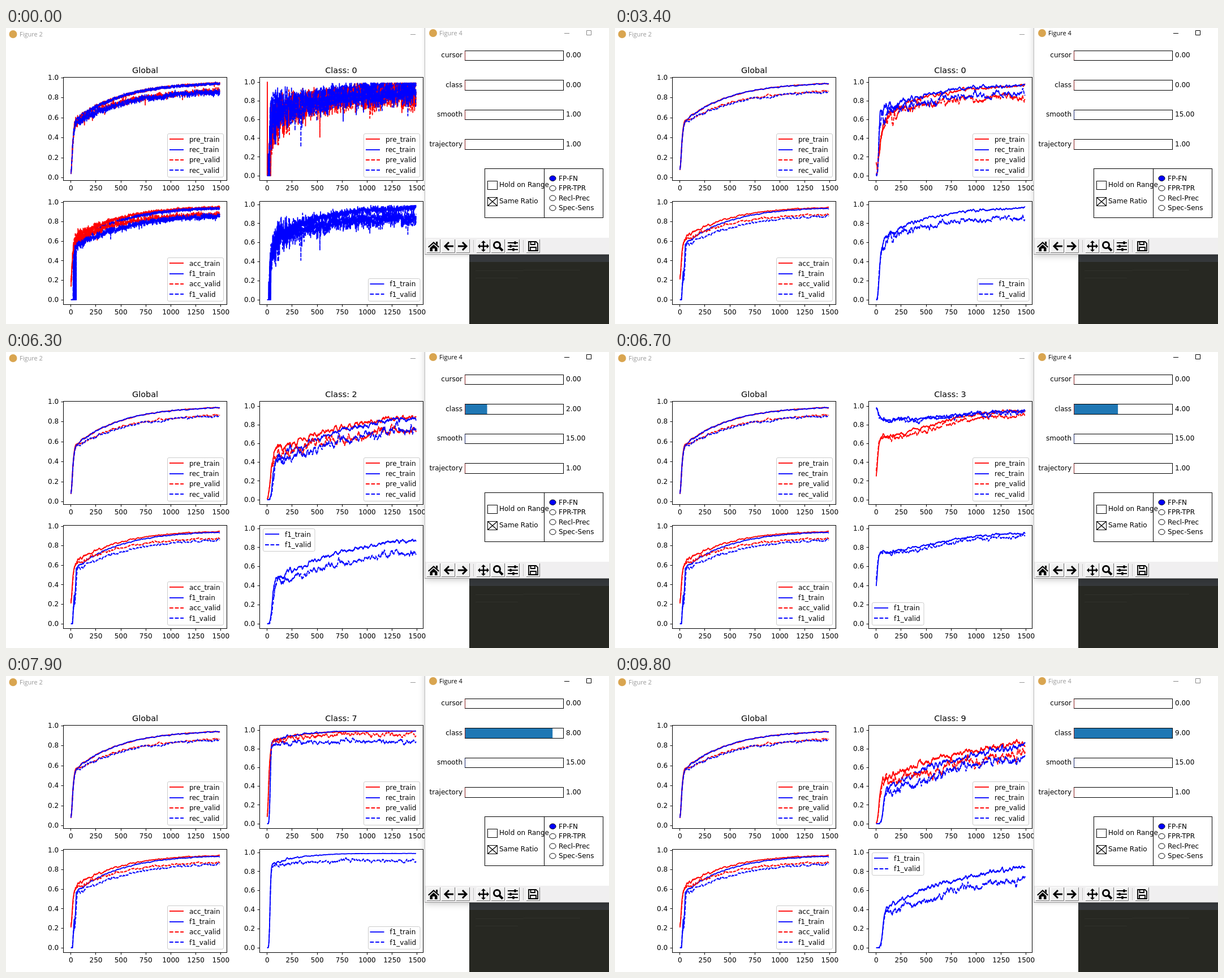
An HTML page for the animation above (10 s loop, 1066 px wide and 525 px high).

```html
<!DOCTYPE html>
<html lang="en">
<head>
<meta charset="utf-8">
<title>Training figures</title>
<style>
html, body { margin: 0; width: 100%; height: 100%; overflow: hidden; background: #fff; }
svg { display: block; width: 1066px; height: 525px; }
text { font: 12px "DejaVu Sans", sans-serif; white-space: pre; }
.title { font-size: 14.4px; text-anchor: middle; }
.bar { font: 11px "Open Sans", "Noto Sans", sans-serif; }
.end { text-anchor: end; }
.mid { text-anchor: middle; }
.curve { fill: none; stroke-width: 1.8; stroke-linejoin: round; }
.dash { stroke-dasharray: 6.7 2.9; }
.box { fill: #fff; stroke: #000; }
</style>
</head>
<body>
<svg id="stage" viewBox="0 0 1066 525"></svg>
<script>
const LOOP = 10000, COUNT = 1490, PX = 265 / 1500;
const RED = '#f00', BLUE = '#00f';
const stage = document.getElementById('stage');

// ---- markup helpers ----
const text = (x, baseline, s, cls = '', extra = '') =>
  `<text x="${x}" y="${Math.round(baseline)}" class="${cls}" ${extra}>${s}</text>`;
const rect = (x, y, w, h, attrs) =>
  `<rect x="${x}" y="${y}" width="${w}" height="${h}" ${attrs}/>`;
const path = (d, attrs) => `<path d="${d}" ${attrs}/>`;
const curve = (d, color, dashed) =>
  path(d, `class="curve${dashed ? ' dash' : ''}" stroke="${color}"`);
const snap = v => Math.floor(v) + .5;

// ---- learning curves ----
const rise = (x, scale, power) => 1 - Math.exp(-((x / scale) ** power));

// A quick climb to the knee, then a slow approach to the end
const skill = options =>
  ({ start: 0, rise: 20, sharp: 1.5, pace: 450, bend: 1, gap: 0, ...options });

function level(s, x, validating) {
  const early = rise(x, s.rise, s.sharp), late = rise(x, s.pace, s.bend);
  const value = s.start + early * (s.knee - s.start + late * (s.end - s.knee));
  return value - (validating ? s.gap * rise(x, 250, 1) : 0);
}

function mix(a, b, k) {
  if (typeof a === 'number') return a + (b - a) * k;
  return Object.fromEntries(Object.keys(a).map(key => [key, mix(a[key], b[key], k)]));
}

const noise = (amp, early) => ({ amp, early });

const noisy = {
  pre: skill({ knee: .57, end: .975, rise: 45, gap: .11 }),
  rec: skill({ knee: .62, end: .98, gap: .09 }),
  train: noise(.024, 4), valid: noise(.06, 1.7), drop: 30
};
const biased = {
  pre: skill({ start: .24, knee: .67, end: .95, pace: 700, bend: 2, gap: .05 }),
  rec: skill({ start: .99, knee: .86, end: .95, pace: 900, bend: 3, gap: .015 }),
  train: noise(.022, .6), valid: noise(.035, .3), drop: 0
};
const easy = {
  pre: skill({ knee: .86, end: .995, pace: 300, gap: .03 }),
  rec: skill({ knee: .84, end: .995, rise: 32, sharp: 6, pace: 250, gap: .115 }),
  train: noise(.004, 11), valid: noise(.038, .5), drop: 0
};
const hard = {
  pre: skill({ knee: .44, end: .96, rise: 38, sharp: 2, pace: 900, gap: .125 }),
  rec: skill({ knee: .29, end: .97, rise: 75, sharp: 5, pace: 900, gap: .12 }),
  train: noise(.045, .3), valid: noise(.075, 0), drop: 0
};
const CLASSES = [
  noisy, mix(hard, noisy, .45), mix(hard, noisy, .25), biased,
  mix(noisy, easy, .3), mix(noisy, easy, .6), mix(noisy, easy, .8),
  easy, mix(noisy, easy, .9), hard
];

function random(seed) {
  return () => {
    seed = (seed + 0x6D2B79F5) | 0;
    let v = Math.imul(seed ^ (seed >>> 15), 1 | seed);
    v = (v + Math.imul(v ^ (v >>> 7), 61 | v)) ^ v;
    return ((v ^ (v >>> 14)) >>> 0) / 4294967296;
  };
}

// Learning curve with jitter, slow drift, rare dips and early zeros
function series(s, { amp, early }, seed, validating, drop = 0) {
  const rnd = random(seed * 7919);
  const gauss = () => (rnd() + rnd() + rnd() - 1.5) * 2;
  let drift = 0;
  return Array.from({ length: COUNT }, (_, x) => {
    const base = level(s, x, validating);
    drift = .95 * drift + .31 * gauss();
    let n = gauss() + .35 * drift;
    if (rnd() < .006) n -= 4 * rnd();
    const scale = amp * (1 + early * Math.exp(-x / 200)) * Math.min(1, base * 4);
    const zero = rnd() < 1.3 * (1 - x / drop) && drop > 0;
    return zero ? 0 : Math.max(0, Math.min(.99, base + n * scale));
  });
}

const f1 = (p, r) => p.map((v, i) => v + r[i] ? 2 * v * r[i] / (v + r[i]) : 0);

function makeClass(c) {
  const k = CLASSES[c], seed = c * 10 + 20;
  const pre = series(k.pre, k.train, seed, false);
  const rec = series(k.rec, k.train, seed + 1, false, k.drop);
  const preV = series(k.pre, k.valid, seed + 2, true);
  const recV = series(k.rec, k.valid, seed + 3, true, k.drop);
  if (c === 0) pre[1] = 1; // one lucky first guess
  return { scores: [pre, rec, preV, recV], f1: [f1(pre, rec), f1(preV, recV)] };
}

const score = skill({ start: .04, knee: .52, end: .955, gap: .085 });
const accuracy = skill({ start: .2, knee: .59, end: .96, gap: .07 });
const trainNoise = noise(.006, 2.5), validNoise = noise(.014, .9);
const globalScores = [
  series(score, trainNoise, 1, false), series(score, trainNoise, 2, false),
  series({ ...score, gap: .075 }, validNoise, 3, true), series(score, validNoise, 4, true)
];
const globalAcc = [
  series(accuracy, noise(.007, 5), 5, false), series(score, trainNoise, 6, false, 55),
  series(accuracy, noise(.013, 2), 7, true), series(score, validNoise, 8, true, 55)
];

function smoothed(data, size) {
  const half = size >> 1;
  return data.map((_, i) => {
    const part = data.slice(Math.max(0, i - half), i + half + 1);
    return part.reduce((a, b) => a + b, 0) / part.length;
  });
}

// ---- charts ----
const chart = (x, y, zero, unit) => ({ x, y, x0: x + 13.3, zero, unit });
const TL = chart(101.5, 87.5, 265.5, 177.5), TR = chart(448.5, 87.5, 262, 166);
const BL = chart(101.5, 307.5, 482, 173), BR = chart(448.5, 307.5, 482, 169);

function axes({ x, y, x0, zero, unit }) {
  let marks = '', labels = '';
  for (let i = 0; i <= 6; i++) {
    const tx = x0 + i * 250 * PX;
    marks += `M${snap(tx)} ${y + 183}v4`;
    labels += text(tx, y + 200.5, i * 250, 'mid');
  }
  for (let i = 0; i <= 5; i++) {
    const ty = zero - unit * i / 5;
    marks += `M${x} ${snap(ty)}h-4`;
    labels += text(x - 8.4, ty + 3.8, (i / 5).toFixed(1), 'end');
  }
  return rect(x, y, 289, 183, 'fill="none" stroke="#000"') + path(marks, 'stroke="#000"') + labels;
}

const colorOf = (i, list) => list.length === 4 && i % 2 === 0 ? RED : BLUE;

function curves({ x0, zero, unit }, list, size) {
  return list.map((data, i) => {
    const d = 'M' + smoothed(data, size).map((v, x) =>
      (x0 + x * PX).toFixed(1) + ' ' + (zero - v * unit).toFixed(1)).join('L');
    return curve(d, colorOf(i, list), i >= list.length / 2);
  }).join('');
}

function legend(axis, names, place = 'lower right') {
  const w = names.length === 4 ? 99 : 91.5, h = names.length * 18.35 + 3.6;
  const x = place.includes('left') ? axis.x + 6 : axis.x + 283 - w;
  const y = place.includes('upper') ? axis.y + 6 : axis.y + 177 - h;
  return rect(snap(x), snap(y), w, Math.round(h), 'rx="2.5" fill="#fff" fill-opacity=".8" stroke="#ccc"') +
    names.map((name, i) => {
      const row = y + i * 18.35;
      return curve(`M${x + 3.5} ${Math.round(row + 9.7)}h25`, colorOf(i, names), i >= names.length / 2) +
        text(x + 38.5, row + 14.1, name);
    }).join('');
}

const SCORE_NAMES = ['pre_train', 'rec_train', 'pre_valid', 'rec_valid'];
const ACC_NAMES = ['acc_train', 'f1_train', 'acc_valid', 'f1_valid'];
const F1_NAMES = ['f1_train', 'f1_valid'];

// The legend goes where the curves leave room
function f1Place({ pre, rec }) {
  if (rec.knee < .5) return 'upper left';
  return pre.start > 0 ? 'lower left' : 'lower right';
}

const globalCharts = size =>
  curves(TL, globalScores, size) + axes(TL) + legend(TL, SCORE_NAMES) +
  curves(BL, globalAcc, size) + axes(BL) + legend(BL, ACC_NAMES);

function classCharts(c, size) {
  const data = makeClass(c);
  return text(592.5, 80, 'Class: ' + c, 'title') +
    curves(TR, data.scores, size) + axes(TR) + legend(TR, SCORE_NAMES) +
    curves(BR, data.f1, size) + axes(BR) + legend(BR, F1_NAMES, f1Place(CLASSES[c]));
}

// ---- control window ----
const icon = (x, y) => `<circle cx="${x}" cy="${y}" r="7" fill="#d9a550"/>`;

function slider(id, i) {
  const top = snap(40.4 + i * 52.4), h = snap(57.9 + i * 52.4) - top;
  const baseline = 52.45 + i * 52.4;
  return text(807, baseline, id, 'end') +
    rect(811.5, top, 174, h, 'fill="#fff"') +
    rect(812, top, 0, h, `id="${id}Fill" fill="#1f77b4"`) +
    rect(811.5, top, 174, h, 'fill="none" stroke="#000"') +
    path(`M811.5 ${top + .5}v${h - 1}`, `id="${id}Mark" stroke="#8b2020"`) +
    text(990, baseline, id === 'trajectory' ? '1.00' : '0.00', '', `id="${id}Value"`);
}

function button(x, glyph) {
  return rect(x, 375, 24, 24, 'fill="#f0f0f0"') +
    path(`M${x + .5} 398v-22.5h23`, 'fill="none" stroke="#fff"') +
    path(`M${x} 398.5h23.5v-23.5`, 'fill="none" stroke="#777"') +
    `<g transform="translate(${x + 12} 387)" fill="none" stroke="#000" stroke-width="3">${glyph}</g>`;
}

const ARROW = path('M9 0H-6M1 -7L-6 0L1 7', '');
const heads = [0, 90, 180, 270].map(a =>
  path('M-4 -6L0 -10L4 -6Z', `transform="rotate(${a})" fill="#000" stroke="none"`)).join('');
const HOME = path('M-10 1L0 -8L10 1L8.5 2.5L0 -5L-8.5 2.5ZM-6.5 3L0 -3L6.5 3V9H2V4H-2V9H-6.5ZM4 -8h3v6l-3 -3Z',
  'fill="#000" stroke="none"');
const BACK = ARROW, NEXT = `<g transform="scale(-1 1)">${ARROW}</g>`;
const MOVE = path('M-8 0H8M0 -8V8', 'stroke-width="2.4"') + heads;
const ZOOM = '<circle cx="-2" cy="-2" r="5.5"/>' + path('M2.5 2.5L8 8', 'stroke-width="4"');
const TUNE = path('M-9 -6H9M-9 0H9M-9 6H9', 'stroke-width="1.8"') +
  path('M4 -8.5v5M-4 -2.5v5M1 3.5v5', 'stroke-width="3.4"');
const SAVE = path('M-8 -8H5L8 -5V8H-8ZM-4.5 -8V-3H3V-8M-5 8V2H5V8', 'stroke-width="1.8"');
const group = (x, glyphs) => glyphs.map((glyph, i) => button(x + i * 26, glyph)).join('');

function options() {
  const radios = ['FP-FN', 'FPR-TPR', 'Recl-Prec', 'Spec-Sens'].map((s, i) => {
    const y = 266.7 + i * 17.5;
    return `<ellipse cx="966.5" cy="${y}" rx="5.6" ry="4.7" fill="${i ? '#fff' : BLUE}" stroke="#000"/>` +
      text(977, y + 3.8, s);
  }).join('');
  return rect(846.5, 249.5, 209, 87, 'class="box"') + path('M951.5 249.5v87', 'stroke="#000"') +
    rect(851.5, 271.5, 17, 15, 'class="box"') + rect(851.5, 300.5, 17, 15, 'class="box"') +
    path('M851.5 300.5l17 15m0 -15l-17 15', 'stroke="#000" stroke-width="1.3"') +
    text(872, 282, 'Hold on Range') + text(872, 311.4, 'Same Ratio') + radios;
}

stage.innerHTML =
  rect(0, 0, 1066, 525, 'fill="#fff"') +
  icon(12.5, 11) + text(24, 15, 'Figure 2', 'bar', 'fill="#999"') +
  path('M715 11.5h9', 'stroke="#999"') + text(246, 80, 'Global', 'title') +
  '<g id="global"></g><g id="class"></g>' +
  rect(819, 400, 247, 125, 'fill="#272822"') + rect(819, 400, 247, 15, 'fill="#36393c"') +
  path('M830 430.5h85M915 429.5h100M830 443.5h75', 'stroke="#30312b"') +
  rect(741, -10, 340, 411, 'id="window" fill="#fff"') +
  path('M740.5 0V401.5', 'stroke="#bbb"') + path('M740 401.5H1066', 'stroke="#999"') +
  icon(755, 9) + text(766, 13, 'Figure 4', 'bar', 'id="caption"') +
  path('M987 9.5h9M1026.5 4.5h8v8h-8Z', 'id="buttons" fill="none"') +
  ['cursor', 'class', 'smooth', 'trajectory'].map(slider).join('') + options() +
  rect(741, 372, 325, 29, 'fill="#f0eff0"') +
  path('M826.5 376v22M914.5 376v22', 'stroke="#c4c4c4"') +
  group(744, [HOME, BACK, NEXT]) + group(832, [MOVE, ZOOM, TUNE]) + group(920, [SAVE]);

// ---- timeline ----
const $ = id => document.getElementById(id);
const passed = (t, times) => times.filter(v => v <= t).length;
const SIZES = [1, 8, 15];
const SLIDES = [5700, 6100, 6400, 6700, 7000, 7300, 7600, 7900, 8200];
const DRAWS = [5900, 6300, 6600, 6900, 7300, 7600, 7900, 8100, 8500];

const cache = {}, shown = {};
function show(id, key, make) {
  if (shown[id] === key) return;
  shown[id] = key;
  $(id).innerHTML = cache[id + key] || (cache[id + key] = make());
}

function render(t) {
  const size = SIZES[passed(t, [2100, 3400])], cls = passed(t, DRAWS);
  show('global', size, () => globalCharts(size));
  show('class', cls + '/' + size, () => classCharts(cls, size));

  const slide = passed(t, SLIDES), smooth = SIZES[passed(t, [1900, 3200])];
  $('classFill').setAttribute('width', slide * 173.5 / 9);
  $('classValue').textContent = slide.toFixed(2);
  $('smoothValue').textContent = smooth.toFixed(2);
  $('smoothMark').setAttribute('stroke', smooth === 15 ? '#1c2a70' : '#8b2020');

  const active = t >= 1800 && t < 9800;
  $('caption').setAttribute('fill', active ? '#000' : '#999');
  $('buttons').setAttribute('stroke', active ? '#000' : '#888');
  $('window').style.filter = active
    ? 'drop-shadow(0 3px 6px rgba(0,0,0,.22))' : 'drop-shadow(0 2px 3px rgba(0,0,0,.18))';
}

const start = performance.now();
function frame() {
  render((performance.now() - start) % LOOP);
  requestAnimationFrame(frame);
}
frame();
</script>
</body>
</html>
```
